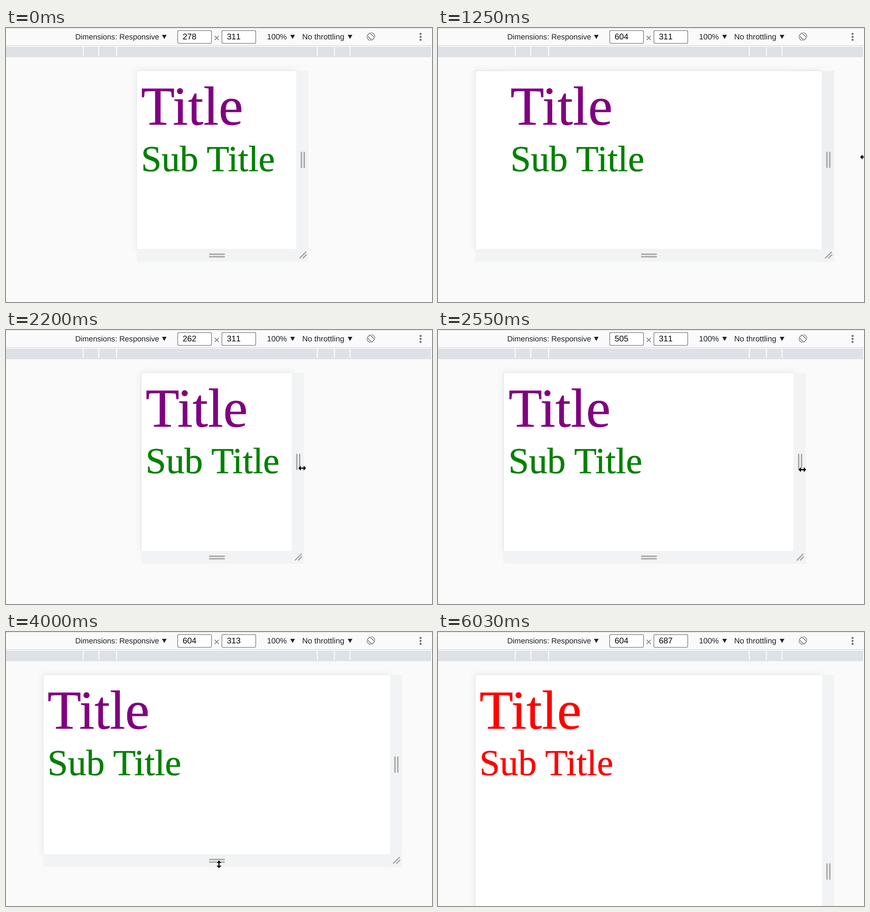
Animation of 932x601 px, one loop 6120 ms. Source, as an HTML page:

```html
<!DOCTYPE html>
<html lang="en">
<head>
<meta charset="utf-8">
<title>Responsive viewport</title>
<style>
  html, body { margin: 0; width: 100%; height: 100%; overflow: hidden; background: #fafafa; }
  svg { display: block; width: 932px; height: 601px; text-rendering: geometricPrecision; }
  .ui { font: 16.7px "Liberation Sans", Arial, sans-serif; font-kerning: none; fill: #202124; }
  .size { font-size: 18px; fill: #000; }
  .page { font-family: "Liberation Serif", "Times New Roman", serif; }
  .page text { fill: currentColor; stroke: currentColor; stroke-width: .6; }
  .field { fill: #fff; stroke: #767676; stroke-width: 1.3; }
  .bar { fill: #f1f3f4; }
  .grip { stroke: #a5a5a5; stroke-width: 3; stroke-linecap: round; fill: none; }
  .icon { stroke: #6e6e6e; stroke-width: 1.5; fill: none; }
  #frame { fill: #fff; filter: drop-shadow(0 0 8px rgba(0, 0, 0, .08)); }
  .pointer { fill: #000; stroke: #fff; stroke-width: 1.5; paint-order: stroke; stroke-linejoin: round; }
</style>
</head>
<body>
<svg viewBox="0 0 932 601">
  <defs>
    <path id="double" d="M-8.5 0 L-3 -5.5 V-1.3 H3 V-5.5 L8.5 0 L3 5.5 V1.3 H-3 V5.5Z"/>
    <path id="caret" d="M0 0 H10 L5 9Z" fill="#202124"/>
  </defs>
  <rect width="932" height="601" fill="#fafafa"/>

  <rect id="frame" y="94"/>
  <path id="edge" fill="none" stroke="#dcdfe0"/>
  <rect id="rightBar" class="bar" y="94" width="27"/>
  <rect id="bottomBar" class="bar" height="28"/>
  <path id="rightGrip" class="grip" d="M11.3 -16.5 V16.5 M17.5 -16.5 V16.5"/>
  <path id="bottomGrip" class="grip" d="M445.5 11.7 H477.5 M445.5 17.3 H477.5"/>
  <path id="cornerGrip" class="grip" style="stroke-width:2.5" d="M8 20 L21 7 M15 20 L22 13"/>
  <g id="page" class="page">
    <rect id="sheet" y="94.5" fill="#fff"/>
    <text id="title" x="9.5" y="212" font-size="120.5">Title</text>
    <text id="subtitle" x="9.5" y="314.3" font-size="80.4">Sub Title</text>
  </g>

  <rect width="932" height="38" fill="#fafafa"/>
  <path d="M0 .5 H932" stroke="#dcdcdc"/>
  <path d="M0 38.5 H932" stroke="#cacdd1"/>
  <rect y="39" width="932" height="2" fill="#fcfcfc"/>
  <rect y="41" width="930" height="23" fill="#dee1e6"/>
  <path d="M169 41 v20 M203 41 v20 M242 41 v20 M681 41 v20 M718.5 41 v20 M752.5 41 v20" stroke="#fafafa" stroke-width="2.4"/>

  <g class="ui">
    <text x="151.5" y="25">Dimensions: Responsive</text>
    <text x="571" y="25" style="font-size:17px">100%</text>
    <text x="648" y="25" style="font-size:17.1px">No throttling</text>
    <rect class="field" x="375.6" y="5.6" width="74" height="28" rx="2.5"/>
    <rect class="field" x="472.4" y="5.6" width="74" height="28" rx="2.5"/>
    <text id="widthText" class="size" x="386.5" y="25"></text>
    <text id="heightText" class="size" x="483.3" y="25"></text>
  </g>
  <use href="#caret" x="341.3" y="15"/>
  <use href="#caret" x="622" y="15"/>
  <use href="#caret" x="747.7" y="15"/>
  <path class="icon" d="M456.5 17.3 l9 9 m0 -9 l-9 9"/>
  <g class="icon" transform="translate(798.3 18.8)">
    <rect x="-4.3" y="-7.3" width="8.6" height="14.6" rx="1.6" transform="rotate(-45)"/>
    <path d="M1 -8.6 A8.8 8.8 0 0 1 8.7 0 M-1 8.6 A8.8 8.8 0 0 1 -8.7 0" stroke-width="1.3"/>
  </g>
  <path d="M907 13 V27" stroke="#6e6e6e" stroke-width="4.6" stroke-linecap="round" stroke-dasharray="0 6.5"/>

  <g id="cursor">
    <circle id="touch" r="12" fill="#9c9c9c"/>
    <use id="across" href="#double" class="pointer"/>
    <use id="upDown" href="#double" class="pointer" transform="rotate(90)"/>
    <path id="arrow" class="pointer" d="M0 0 V16 L4 12.5 L6.5 18.5 L9 17.4 L6.5 11.7 H11.5Z"/>
  </g>
</svg>
<script>
  const LOOP = 6120, STEP = 50, SCALE = 1.2556, CENTER = 460.5, TOP = 94, BAR = 27;
  const el = Object.fromEntries([...document.querySelectorAll('[id]')].map(e => [e.id, e]));

  const linear = p => p;
  const easeIn = p => p * p;
  const easeOut = p => 1 - (1 - p) ** 3;
  const easeInOut = p => (1 - Math.cos(Math.PI * p)) / 2;

  // Eases from one value to the next; each move is [start, end, easing, target]
  const mix = (a, b, p) => a + (b - a) * p;
  const follow = (initial, moves) => t => moves.reduce((value, [start, end, ease, target]) =>
    t <= start ? value : mix(value, target, ease(Math.min(1, (t - start) / (end - start)))), initial);

  const widthAt = follow(278, [
    [600, 1200, easeIn, 496],
    [1200, 1434, easeOut, 706],
    [1600, 2000, easeOut, 265],
    [2100, 2150, linear, 262],
    [2300, 2500, easeInOut, 503],
    [2500, 2950, easeInOut, 584],
    [2950, 3050, linear, 604]
  ]);
  const heightAt = follow(311, [
    [3950, 4600, easeInOut, 467],
    [4700, 5050, easeInOut, 689],
    [5200, 5250, linear, 687]
  ]);
  const cursorX = follow(540, [
    [150, 350, easeOut, 700],
    [350, 500, easeInOut, 652],
    [600, 1250, easeIn, 932],
    [1600, 1850, easeOut, 648],
    [2300, 2500, easeInOut, 797],
    [2550, 3050, linear, 866],
    [3100, 3600, easeInOut, 466]
  ]);
  const cursorY = follow(590, [
    [150, 350, easeOut, 246],
    [350, 500, easeInOut, 290],
    [600, 1250, linear, 283],
    [1600, 1850, easeOut, 303],
    [2300, 3050, linear, 313],
    [3100, 3600, easeInOut, 511],
    [3650, 3800, linear, 505],
    [3950, 4200, easeIn, 620]
  ]);

  const set = (node, attrs) => {
    for (const name in attrs) node.setAttribute(name, attrs[name]);
  };
  const move = (node, x, y) => set(node, { transform: `translate(${x} ${y})` });
  const span = width => ({ left: CENTER - width * SCALE / 2, right: CENTER + width * SCALE / 2 });

  function cursorKind(t, x, y, right, bottom) {
    if (t >= 4000) return 'upDown';
    if (x < right && y > TOP && y < bottom) return 'touch';
    if (t >= 650 && t <= 3100) return 'across';
    if (y >= bottom && y <= bottom + 28) return 'upDown';
    if (x >= right && x <= right + BAR && y > TOP && y < bottom) return 'across';
    return 'arrow';
  }

  function draw(t) {
    const width = widthAt(t), height = heightAt(t);
    const { left, right } = span(width);
    const tall = height * SCALE, bottom = TOP + tall;
    // The page content trails the frame by one step
    const pageWidth = widthAt(t - STEP), page = span(pageWidth);

    set(el.frame, { x: left, width: right - left, height: tall });
    set(el.edge, { d: `M${left} ${bottom} V${TOP} H${right}` });
    set(el.rightBar, { x: right, height: tall + 28 });
    el.rightBar.style.fill = t >= 650 && t <= 1600 ? '#edeff1' : '';
    set(el.bottomBar, { x: left, y: bottom, width: right - left + BAR });
    move(el.rightGrip, right, TOP + tall / 2);
    move(el.bottomGrip, 0, bottom);
    move(el.cornerGrip, right, bottom);

    move(el.page, page.left, 0);
    set(el.sheet, { x: .5, width: pageWidth * SCALE - .5, height: tall - .5 });
    const large = width >= 600 && height >= 600;
    el.title.style.color = large ? 'red' : 'purple';
    el.subtitle.style.color = large ? 'red' : 'green';
    el.widthText.textContent = Math.round(width);
    el.heightText.textContent = Math.round(height);

    const x = cursorX(t), y = cursorY(t);
    const kind = cursorKind(t, x, y, Math.max(right, page.right), bottom);
    move(el.cursor, x, y);
    el.cursor.style.display = t < 150 || y > 615 ? 'none' : '';
    for (const name of ['touch', 'across', 'upDown', 'arrow'])
      el[name].style.display = name === kind ? '' : 'none';
  }

  const start = performance.now();
  function tick() {
    const t = (performance.now() - start) % LOOP;
    draw(Math.floor(t / STEP) * STEP);
    requestAnimationFrame(tick);
  }
  tick();
</script>
</body>
</html>
```
